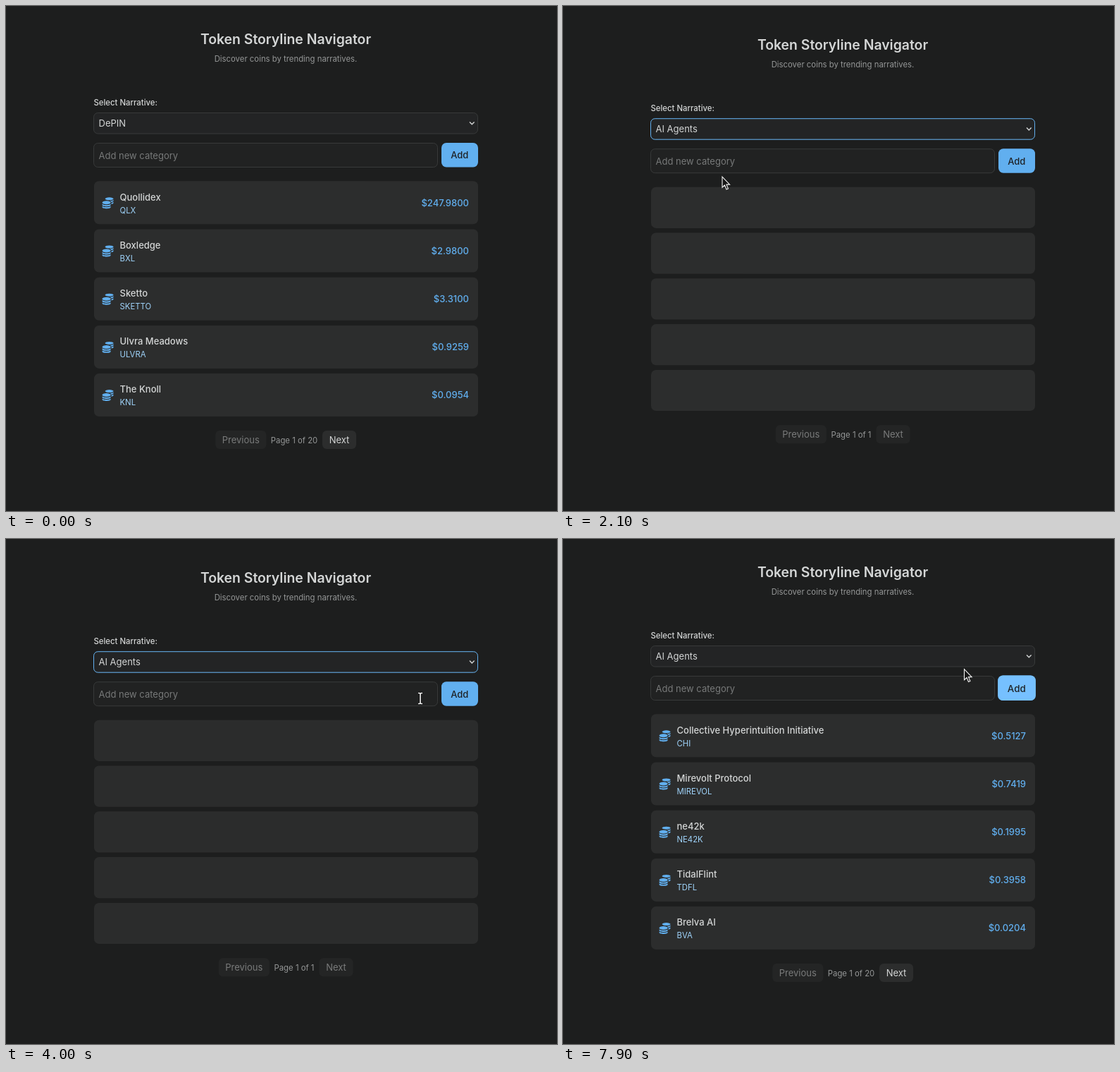
These frames come from a looping animation (782x716 px, 8 s). An HTML page:

```html
<!DOCTYPE html>
<html lang="en">
<head>
<meta charset="utf-8">
<title>Token Storyline Navigator</title>
<style>
  html, body { margin: 0; width: 100%; height: 100%; overflow: hidden; background: #1d1e1e; }
  svg { display: block; width: 782px; height: 716px; }
  text { font: 13px Inter, "Open Sans", sans-serif; fill: #d4d6d6; white-space: pre; }
  .title { font-size: 19.4px; font-weight: 600; }
  .small { font-size: 11.35px; }
  .medium { font-weight: 500; }
  .muted { fill: #959797; }
  .hint { fill: #777979; }
  .ticker { fill: #9fd3fa; }
  .price { fill: #61afef; font-weight: 500; }
  .dark { fill: #1e2226; font-weight: 500; }
  .option { font: 12.6px "Noto Sans", "Open Sans", sans-serif; fill: #eee; }
</style>
</head>
<body>
<svg id="stage" viewBox="0 0 782 716"></svg>
<script>
const LOOP = 8000, STEP = 100;
const BG = '#1d1e1e', CARD = '#2c2d2d', LINE = '#383a3a', BLUE = '#61afef';
const stage = document.getElementById('stage');

const lists = {
  'DePIN': [
    ['Quollidex', 'QLX', '247.9800'],
    ['Boxledge', 'BXL', '2.9800'],
    ['Sketto', 'SKETTO', '3.3100'],
    ['Ulvra Meadows', 'ULVRA', '0.9259'],
    ['The Knoll', 'KNL', '0.0954']
  ],
  'AI Agents': [
    ['Collective Hyperintuition Initiative', 'CHI', '0.5127'],
    ['Mirevolt Protocol', 'MIREVOL', '0.7419'],
    ['ne42k', 'NE42K', '0.1995'],
    ['TidalFlint', 'TDFL', '0.3958'],
    ['Brelva AI', 'BVA', '0.0204']
  ]
};
const options = ['DePIN', 'Gaming Utility', 'AI Agents', 'RWA'];

// Typed text: [time, value, caret x]
const typing = [[0, '', 132.5], [5700, 'o', 140], [5800, 'or', 145], [6000, 'ora', 152],
  [6100, 'orac', 159.5], [6300, 'oracle', 170], [7500, '', 132.5]];

// Pointer path: [time, x, y, shape from this time on]
const path = [
  [0, 409, 760, 'none'], [100, 409, 700, 'arrow'], [400, 330, 360, 'arrow'], [700, 235, 170, 'arrow'],
  [1200, 235, 170, 'arrow'], [1400, 222, 223.5, 'arrow'], [1500, 222, 226, 'arrow'], [1800, 226, 242, 'arrow'],
  [2100, 226, 242, 'arrow'], [2200, 290, 232, 'beam'], [2600, 600, 232, 'beam'], [3800, 600, 232, 'beam'],
  [4000, 588, 226, 'beam'], [4400, 588, 226, 'beam'], [4600, 531, 223, 'beam'], [5600, 531, 223, 'none'],
  [6700, 545, 216, 'beam'], [6800, 640, 172, 'arrow'], [6900, 712, 150, 'arrow'], [7000, 673.5, 193.5, 'arrow'],
  [7100, 655, 207, 'hand'], [7300, 645, 210, 'hand'], [7700, 645, 210, 'hand'], [7800, 612, 198, 'arrow'],
  [7900, 569.5, 184.5, 'arrow'], [8000, 569.5, 184.5, 'arrow']
];

const outlined = d => `<path d="${d}" fill="#161616" stroke="#f2f2f2" stroke-width="1.1"/>`;
const beam = (color, width) =>
  `<path d="M-3-7.5H-1L0-6.5 1-7.5H3M0-6.5V6.5M-3 7.5H-1L0 6.5 1 7.5H3" fill="none" stroke="${color}" stroke-width="${width}"/>`;
const shapes = {
  none: '',
  arrow: outlined('M0 0V15.2L3.5 12 6 18 8.4 17 6 11.1H10.6Z'),
  beam: beam('#111', 3.6) + beam('#f4f4f4', 1.6),
  hand: outlined('M-1.5 1Q0-1 1.5 1V6L7 7.2Q9 8 8.5 10.5L7 16H0L-4 10.5Q-4 8-1.5 9.5Z')
};

const clamp = v => Math.max(0, Math.min(1, v));
const between = (t, a, b) => t >= a && t < b;
const text = (x, y, str, cls = '', anchor = 'start') =>
  `<text x="${x}" y="${y}" class="${cls}" text-anchor="${anchor}">${str}</text>`;
const box = (x, y, w, h, r, fill, extra = '') =>
  `<rect x="${x}" y="${y}" width="${w}" height="${h}" rx="${r}" fill="${fill}" ${extra}/>`;
const shift = (x, y, body) => `<g transform="translate(${x} ${y})">${body}</g>`;

// Two stacks of coins on a 16 unit grid
const coins = `<g fill="${BLUE}">
  <ellipse cx="10" cy="2" rx="6" ry="2"/><ellipse cx="6" cy="7.5" rx="6" ry="2.5"/>
  <path d="M11 5Q14.4 4.8 16 3.7V5Q16 6.2 12.9 6.8 12.4 5.7 11 5Z"/>
  <path d="M13 7.7Q15 7.3 16 6.7V8Q16 9 13 9.7Z"/>
  <path d="M0 9.4Q2 11 6 11T12 9.4V11C12 13.6 0 13.6 0 11Z"/>
  <path d="M0 12.7Q2 14 6 14T12 12.7V14C12 16.6 0 16.6 0 14Z"/></g>`;

function header(t, choice) {
  const focus = t < 4800 ? clamp((t - 800) / 200) : clamp((5000 - t) / 200);
  return text(397, 53.5, 'Token Storyline Navigator', 'title', 'middle') +
    text(397, 78.6, 'Discover coins by trending narratives.', 'small muted', 'middle') +
    text(124.5, 140.6, 'Select Narrative:', 'small medium') +
    box(124.5, 151.5, 545, 29.5, 6, '#232425', `stroke="${LINE}"`) +
    box(124.5, 151.5, 545, 29.5, 6, 'none', `stroke="${BLUE}" stroke-opacity="${focus}"`) +
    text(131.5, 170.6, choice) +
    '<path d="M658 164.4L661.3 167.7 664.6 164.4" fill="none" stroke="#d4d6d6" stroke-width="1.4"/>';
}

function form(t) {
  const [, value, caretX] = typing.filter(k => k[0] <= t).pop();
  const caret = between(t, 4900, 7200);
  const hover = clamp((t - 7000) / 300);
  const button = (fill, opacity) => box(618, 194, 52, 34.5, 7, fill, `opacity="${opacity}"`);
  return box(124.5, 194.5, 488, 34, 6, '#212222', `stroke="${LINE}"`) +
    (value ? text(131.5, 216.5, value) : text(131.5, 216.5, 'Add new category', 'hint')) +
    (caret ? box(caretX - .5, 204, 1, 16, 0, '#e0e0e0') : '') +
    `<g transform="translate(644 211.3) scale(${1 + .03 * hover}) translate(-644 -211.3)">` +
    button(BLUE, 1) + button('#76c0ff', hover) +
    text(643.8, 216.4, 'Add', 'dark', 'middle') + '</g>';
}

const coinRow = ([name, ticker, price], i) => shift(0, i * 68.2,
  box(125, 248.3, 545, 61, 7, CARD) + shift(136.6, 271.3, coins) +
  text(161.5, 275.5, name, 'medium') + text(161.5, 293.7, ticker, 'small ticker') +
  text(657, 283.7, '$' + price, 'price', 'end'));

function skeleton(t) {
  const opacity = .75 + .25 * Math.cos((t - 2100) / 1000 * Math.PI);
  const cards = [0, 1, 2, 3, 4].map(i => box(125, 256.7 + i * 64.8, 545, 58.2, 7, CARD));
  return `<g opacity="${opacity}">${cards.join('')}</g>`;
}

function pager(loading) {
  const button = (x, w, label, off) => `<g opacity="${off ? .5 : 1}">` +
    box(x, 602, w, 26, 6, CARD) + text(x + w / 2, 619.6, label, '', 'middle') + '</g>';
  const inset = loading ? 4.5 : 0;
  return shift(0, loading ? -7.8 : 0,
    button(297.3 + inset, 72, 'Previous', true) +
    text(409, 619.8, loading ? 'Page 1 of 1' : 'Page 1 of 20', 'small muted', 'middle') +
    button(449 - inset, 48, 'Next', loading));
}

function menu(t) {
  const active = t < 1300 ? 0 : t < 1600 ? 1 : 2;
  return box(125, 181, 544, 96.5, 2, '#363737') +
    box(128, 184 + active * 22.8, 538, 22.6, 1, '#4a4b4b') +
    options.map((name, i) => text(132.5, 199.6 + i * 22.8, name, 'option')).join('');
}

function pointer(t) {
  const i = path.findIndex(k => k[0] > t);
  const [t0, x0, y0, shape] = path[i - 1], [t1, x1, y1] = path[i];
  const p = (t - t0) / (t1 - t0);
  return shift(x0 + (x1 - x0) * p, y0 + (y1 - y0) * p, shapes[shape]);
}

function draw(t) {
  const loading = between(t, 2100, 4100);
  const choice = t < 2100 ? 'DePIN' : 'AI Agents';
  stage.innerHTML = box(0, 0, 782, 716, 0, BG) +
    shift(0, loading ? 8.2 : 0, header(t, choice) + form(t)) +
    (loading ? skeleton(t) : lists[choice].map(coinRow).join('')) +
    pager(loading) +
    (between(t, 900, 2100) ? menu(t) : '') +
    pointer(t);
}

let start, last;
function tick(now) {
  start ??= now;
  const t = Math.floor((now - start) % LOOP / STEP) * STEP;
  if (t !== last) draw(last = t);
  requestAnimationFrame(tick);
}
draw(0);
requestAnimationFrame(tick);
</script>
</body>
</html>
```
